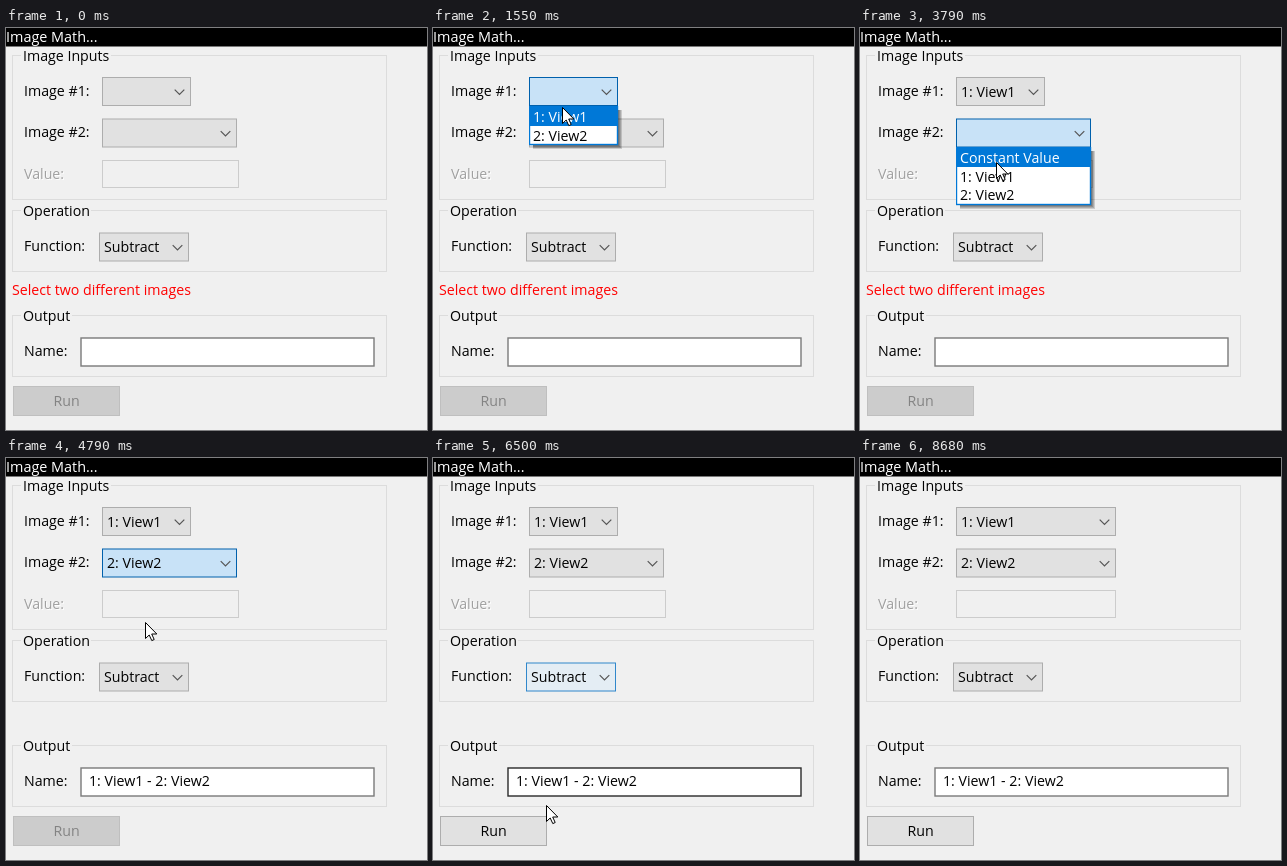
Write an HTML page that moves like this. It is 421x402 px and loops after 9460 ms.

```html
<!DOCTYPE html>
<html lang="en">
<head>
<meta charset="utf-8">
<title>Image Math</title>
<style>
  html, body { margin: 0; width: 100%; height: 100%; overflow: hidden; background: #f0f0f0; }
  #stage { display: block; font: 14.2px "Open Sans", "Noto Sans", sans-serif; }
  .title { fill: #fff; font-size: 14.4px; }
  .group { fill: none; stroke: #dcdcdc; }
  .gap { fill: #f0f0f0; }
  .off { fill: #a0a0a0; }
  .etch { fill: #fff; }
  .error { fill: #f00; }
  .chevron { fill: none; stroke: #555; stroke-width: 1.2; }
  .menu { fill: #fff; stroke: #0078d7; stroke-width: 1.4; }
  .hidden { display: none; }
</style>
</head>
<body>
<svg id="stage" width="421" height="402" viewBox="0 0 421 402">
  <rect width="421" height="402" fill="#f0f0f0"/>
  <rect width="421" height="18.5"/>
  <text class="title" x="0" y="14">Image Math...</text>

  <rect class="group" x="6.5" y="27.5" width="374" height="144"/>
  <rect class="group" x="6.5" y="182.5" width="374" height="61"/>
  <rect class="group" x="6.5" y="287.5" width="374" height="61"/>
  <rect class="gap" x="15" y="22" width="90" height="12"/>
  <rect class="gap" x="15" y="177" width="70" height="12"/>
  <rect class="gap" x="15" y="282" width="51" height="12"/>
  <text x="17" y="33">Image Inputs</text>
  <text x="17" y="188">Operation</text>
  <text x="17" y="293">Output</text>

  <text x="18" y="68">Image #1:</text>
  <text x="18" y="109">Image #2:</text>
  <text class="etch" x="19" y="152">Value:</text>
  <text class="off" x="18" y="151">Value:</text>
  <text x="18" y="223">Function:</text>
  <text x="18" y="328">Name:</text>
  <text class="error" id="error" x="6" y="267">Select two different images</text>

  <rect id="value" x="96.5" y="132.5" width="136" height="27" fill="#f0f0f0" stroke="#ccc"/>
  <rect id="field" x="75" y="310" width="293" height="28" fill="#fff" stroke-width="1.4"/>
  <text id="name" x="83" y="328">1: View1 - 2: View2</text>

  <g id="widgets"></g>
  <path id="cursor" d="M.5 .5V16.5L4.2 13L6.8 18.6L9.2 17.5L6.7 12H11.8Z" fill="#fff" stroke="#000"/>
</svg>
<script>
const LOOP = 9460;
const OPEN_FIRST = 1310, PICK_FIRST = 2320;
const OPEN_SECOND = 3420, PICK_SECOND = 4790;
const READY = 4860, PRESS = 7760, DONE = 8060;
const ENTER = 300, LEAVE = 8680;

const $ = id => document.getElementById(id);
const set = (node, attrs) => {
  for (const key in attrs) node.setAttribute(key, attrs[key]);
};
const add = (parent, tag, attrs, text = '') => {
  const node = document.createElementNS('http://www.w3.org/2000/svg', tag);
  set(node, attrs);
  node.textContent = text;
  return parent.appendChild(node);
};
const show = (node, on) => node.classList.toggle('hidden', !on);

const mix = (a, b, k) => a + (b - a) * k;
const ramp = (t, start, length = 220) => Math.min(1, Math.max(0, (t - start) / length));
const ease = k => k * k * (3 - 2 * k);

// Control brightness: 0 normal, 1 hovered, 2 pressed.
const glow = (t, enter, press, release, leave) =>
  (ramp(t, enter) + ramp(t, press, 60) - ramp(t, release, 160)) * (1 - ramp(t, leave));

const fills = [[225, 225, 225], [229, 241, 251], [200, 226, 247]];
const edges = [[173, 173, 173], [0, 120, 215], [0, 96, 172]];
function blend(colors, level) {
  const i = Math.min(1, Math.floor(level));
  return `rgb(${colors[i].map((c, j) => Math.round(mix(c, colors[i + 1][j], level - i)))})`;
}
const paint = (box, level) =>
  set(box, { fill: blend(fills, level), stroke: blend(edges, level) });

const layer = $('widgets');
function combo(x, y, width, label) {
  const box = add(layer, 'rect', { x: x + 0.5, y: y + 0.5, height: 28 });
  const text = add(layer, 'text', { x: x + 5, y: y + 19.5 }, label);
  const chevron = add(layer, 'path', { class: 'chevron', d: 'M-4.8 -2.4L0 2.4L4.8 -2.4' });
  const resize = w => {
    set(box, { width: w - 1 });
    set(chevron, { transform: `translate(${x + w - 11.5} ${y + 15})` });
  };
  resize(width);
  return { box, text, resize };
}

const ROW = 18.5;
function menu(x, y, width, items) {
  const height = Math.round(2 + items.length * ROW);
  const root = add(layer, 'svg', { x, y, width: width + 4 });
  for (let d = 1; d <= 4; d++) {
    add(root, 'rect', { x: 4, y: 4, width: width + d - 4, height: height + d - 4, opacity: 0.16 });
  }
  add(root, 'rect', { class: 'menu', x: 0.5, y: 0.5, width: width - 1, height: height - 1 });
  const rows = items.map((item, i) => ({
    bar: add(root, 'rect', { x: 1, y: Math.round(1 + i * ROW), width: width - 2, height: 19, fill: '#0078d7' }),
    text: add(root, 'text', { x: 4, y: 16 + i * ROW }, item)
  }));
  return (t, open, close, pointerY) => {
    show(root, t >= open && t < close);
    set(root, { height: (height + 4) * ramp(t, open) });
    const active = Math.floor((pointerY - y - 1) / ROW);
    rows.forEach((row, i) => {
      show(row.bar, i === active);
      set(row.text, { fill: i === active ? '#fff' : '#000' });
    });
  };
}

const first = combo(96, 49, 89, '1: View1');
const second = combo(96, 90.5, 135, '2: View2');
const func = combo(93, 204.5, 90, 'Subtract');
const run = add(layer, 'rect', { x: 7.5, y: 358.5, width: 106, height: 29 });
const runText = add(layer, 'text', { x: 60.5, y: 378, 'text-anchor': 'middle' }, 'Run');
const firstMenu = menu(96, 78, 89, ['1: View1', '2: View2']);
const secondMenu = menu(96, 119, 135, ['Constant Value', '1: View1', '2: View2']);

// Each move eases from the last stop to x, y.
const moves = [
  { from: ENTER, to: 1240, x: 125, y: 67 },
  { from: OPEN_FIRST, to: 1770, x: 132, y: 90 },
  { from: 2800, to: 3100, x: 134, y: 107 },
  { from: OPEN_SECOND, to: 4180, x: 139, y: 164 },
  { from: PICK_SECOND, to: 5490, x: 147, y: 216 },
  { from: 6260, to: 6500, x: 113, y: 347 },
  { from: 6500, to: 6970, x: 80, y: 370 },
  { from: 8450, to: LEAVE, x: 146, y: 400 }
];
function pointer(t) {
  let x = 365, y = 390;
  for (const move of moves) {
    const k = ease(ramp(t, move.from, move.to - move.from));
    x = mix(x, move.x, k);
    y = mix(y, move.y, k);
  }
  return [Math.round(x), Math.round(y)];
}

function render(t) {
  const [x, y] = pointer(t);
  const chosen = t >= PICK_SECOND;
  const ready = t >= READY;
  const wide = t >= DONE;
  const overField = x > 74 && x < 369 && y > 300 && y < 350;

  paint(first.box, glow(t, 1020, OPEN_FIRST, LOOP, PICK_FIRST));
  paint(second.box, glow(t, 2850, OPEN_SECOND, LOOP, PICK_SECOND));
  paint(func.box, glow(t, 5270, LOOP, LOOP, 6440));
  paint(run, glow(t, 6750, PRESS, DONE, 8450));
  if (!ready) set(run, { fill: '#ccc', stroke: '#bfbfbf' });
  set(runText, { fill: ready ? '#000' : '#838383' });
  set($('field'), { stroke: overField ? '#2a2a2a' : '#7a7a7a' });

  first.resize(wide ? 160 : 89);
  second.resize(wide ? 160 : 135);
  set($('value'), { width: wide ? 159 : 136 });

  show(first.text, t >= PICK_FIRST);
  show(second.text, chosen);
  show($('name'), chosen);
  show($('error'), !chosen);
  firstMenu(t, OPEN_FIRST, PICK_FIRST, y);
  secondMenu(t, OPEN_SECOND, PICK_SECOND, y);

  show($('cursor'), t >= ENTER && t < LEAVE);
  set($('cursor'), { transform: `translate(${x} ${y})` });
}

const begin = performance.now();
function tick() {
  render((performance.now() - begin) % LOOP);
  requestAnimationFrame(tick);
}
tick();
</script>
</body>
</html>
```
